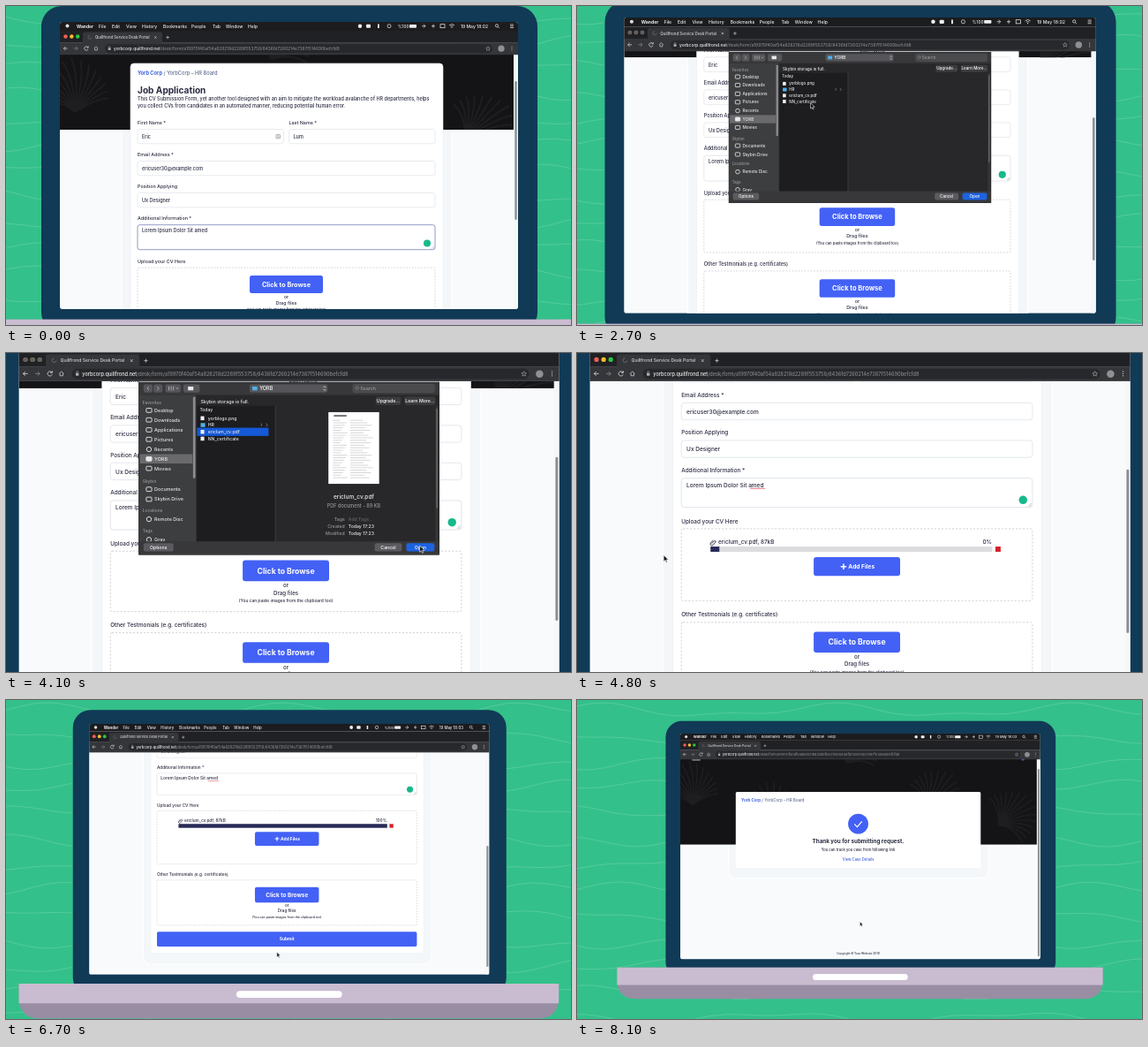
An HTML page for the animation above (8200 ms loop, 640 by 361 pixels).

```html
<!DOCTYPE html>
<html lang="en">
<head>
<meta charset="utf-8">
<title>Job application form</title>
<style>
  html, body { margin: 0; width: 100%; height: 100%; overflow: hidden; background: #34c08a; }
  svg { display: block; width: 100%; height: 100%; font-weight: 500; }
  text { font-family: Inter, "Open Sans", sans-serif; white-space: pre; }
</style>
</head>
<body>
<svg id="stage" viewBox="0 0 640 361"></svg>
<script>
const LOOP = 8200, STEP = 100;
const BLUE = '#4361f5', INK = '#2b2d42', LINE = '#dfe3ea';

// ---- markup helpers ----
const rect = (x, y, w, h, fill, more = '') =>
  `<rect x="${x}" y="${y}" width="${w}" height="${h}" fill="${fill}" ${more}/>`;
const text = (x, y, str, size = 5.5, fill = INK, more = '') =>
  `<text x="${x}" y="${y}" font-size="${size}" fill="${fill}" ${more}>${str}</text>`;
const dot = (x, y, r, fill, more = '') => `<circle cx="${x}" cy="${y}" r="${r}" fill="${fill}" ${more}/>`;
const path = (d, stroke, width = .7, more = '') =>
  `<path d="${d}" fill="none" stroke="${stroke}" stroke-width="${width}" ${more}/>`;
const group = (id, body, more = '') => `<g id="${id}" ${more}>${body}</g>`;
const MID = 'text-anchor="middle"', END = 'text-anchor="end"', BOLD = 'font-weight="700"';

// ---- laptop ----
function laptop() {
  return rect(40, 0, 562, 370, '#103a56', 'rx="23"') +
    '<path d="M-30 354.7H670V372Q670 400 642 400H-2Q-30 400 -30 372Z" fill="#998da4"/>' +
    '<path d="M-30 354.7H670V380H-30Z" fill="#c9bcd1"/>' +
    rect(252, 364, 137, 9, '#fff', 'rx="4.5"');
}

// ---- menu bar, tab strip and address bar ----
function browser() {
  const menu = [[105, 'File'], [120, 'Edit'], [136, 'View'], [154, 'History'], [178, 'Bookmarks'],
    [210, 'People'], [234, 'Tab'], [249, 'Window'], [274, 'Help']];
  const lights = colors => colors.map((c, i) => dot(67.5 + i * 6.85, 34.5, 2.2, c)).join('');
  const W = '#eee', G = '#b4b5b8';
  return rect(61, 18, 519, 10, '#1c1c1f') + dot(69.5, 22.6, 2, '#ddd') +
    text(80, 24.5, 'Wander', 5, W, BOLD) +
    menu.map(([x, s]) => text(x, 24.5, s, 5, W)).join('') +
    dot(401, 22.7, 2.2, W) + rect(408, 20.8, 5, 4, W, 'rx="1"') + rect(421, 20.5, 1.8, 4.5, W) +
    dot(434, 22.7, 2, 'none', `stroke="${W}" stroke-width=".7"`) +
    text(444, 24.5, '%100', 4.6, W) + rect(457, 20.9, 8, 3.8, W, 'rx=".8"') +
    path('M471 22.7H475M473 20.7L475 22.7 473 24.7M482 22.7H486M484 20.7V24.7', W) +
    rect(492, 20.7, 5, 4, 'none', `stroke="${W}" stroke-width=".7"`) +
    path('M502 21.8Q505 19.2 508 21.8M503.3 23.2Q505 21.7 506.7 23.2', W) + dot(505, 24.5, .6, W) +
    text(515, 24.5, '<tspan>19 May</tspan> <tspan id="clock">18:02</tspan>', 5, W) +
    dot(556, 22.3, 1.6, 'none', `stroke="${W}" stroke-width=".7"`) + path('M557.2 23.5L558.7 25', W) +
    path('M571 21H575M571 22.8H575M571 24.6H575', W) +
    rect(61, 28, 519, 13.5, '#202124') + rect(87, 29.5, 90, 13, '#35363a', 'rx="2.5"') +
    lights(['#f15f57', '#f5bd2e', '#2bc840']) + group('idle', lights(['#5f6064', '#5f6064', '#5f6064'])) +
    path('M95 33.2A2 2 0 1 0 97 35.3', '#777', .6) +
    text(101, 37, 'Quillfrond Service Desk Portal', 4.3, '#d5d6d9') +
    path('M168.2 34.3l2.4 2.4m0-2.4l-2.4 2.4M181.3 35.5h3.6M183.1 33.7v3.6', '#ddd', .6) +
    rect(61, 41.2, 519, 14, '#35363a') + rect(112, 43.2, 439, 10, '#27282b', 'rx="5"') +
    path('M69.7 48H65.3M67.3 46l-2 2 2 2', '#ddd') + path('M76.8 48h4.4M79.2 46l2 2-2 2', '#888') +
    path('M92.8 46.8A2.2 2.2 0 1 0 93 48.8M93.2 45.3v1.8h-1.9', '#ddd') +
    path('M99.8 48L102 45.8 104.2 48M100.6 47.6v2.4h2.8v-2.4', '#ddd', .6) +
    rect(115.8, 47.4, 2.8, 2.5, G) + path('M116.3 47.4v-.9a.9.9 0 0 1 1.8 0v.9', G, .5) +
    text(122, 49.8, '<tspan fill="#f1f1f1">yorbcorp.quillfrond.net</tspan>' +
      '/desk/form/a19970f40af54a828218d2289f553758/8436fd7260214e7387f514690befcfd8', 4.75, '#85868a') +
    path('M546 45.7l.7 1.6 1.7.2-1.3 1.1.4 1.7-1.5-.9-1.5.9.4-1.7-1.3-1.1 1.7-.2z', G, .5) +
    dot(561, 48.2, 3.6, '#8f9092') +
    [46, 48, 50].map(y => dot(573, y, .6, G)).join('');
}

// ---- page parts ----
function banner(bottom) {
  let leaves = '';
  [[78, 120], [185, 148], [300, 60], [415, 125], [520, 150], [590, 80]].forEach(([x, y], k) => {
    for (let i = 0; i < 15; i++) {
      const a = -2.9 + i * .18 + k * .25, r = 62 - Math.abs(i - 7) * 3;
      const px = x + r * Math.cos(a), py = y + r * Math.sin(a);
      leaves += `M${x} ${y}Q${(x + px) / 2 + 7} ${(y + py) / 2 - 9} ${px.toFixed(1)} ${py.toFixed(1)}`;
    }
  });
  return `<svg x="61" y="0" width="514" height="${bottom}" viewBox="61 0 514 ${bottom}">` +
    rect(61, 0, 514, bottom, '#141416') + path(leaves, '#1e1e20', 2) + '</svg>';
}

const crumbs = y => text(149, y, `<tspan fill="#3f62d8" font-weight="700">Yorb Corp</tspan>` +
  ' / YorbCorp – HR Board', 5.7, '#5d6b91');

// pale frame around the card, hidden where the banner lies over it
const halo = (y, h) => rect(131, y, 374, h, '#f4f7f9', 'rx="10" stroke="#fff" stroke-width="1.2"');

function field(x, y, w, label, value) {
  return text(x, y, label, 5.4) +
    rect(x, y + 5.5, w, 16.3, '#fff', `rx="2.5" stroke="${LINE}" stroke-width=".7"`) +
    text(x + 5, y + 16, value);
}

const dashed = (id, y, h) =>
  rect(149, y, 337, h, 'none', `id="${id}" rx="1.5" stroke="#c6c8d0" stroke-width=".7" stroke-dasharray="1.8 1.6"`);

const browse = y => rect(276, y, 83, 20, BLUE, 'rx="2.5"') +
  text(317.5, y + 12.7, 'Click to Browse', 7.3, '#fff', `${MID} ${BOLD}`) +
  text(317.5, y + 26, 'or', 5.2, INK, MID) + text(317.5, y + 33, 'Drag files', 5.2, INK, MID) +
  text(317.5, y + 40.4, '(You can paste images from the clipboard too)', 4.1, INK, MID);

function form() {
  const fileRow = path('M178.2 310.5l2.4-2.6a.9.9 0 0 1 1.3 1.2l-2.6 2.8a1.5 1.5 0 0 1-2.2-2l2.5-2.7', INK, .8) +
    text(184.5, 311, 'ericlum_cv.pdf, 87kB', 5.4) + text(447, 311, '0%', 5.4, INK, `id="percent" ${END}`) +
    rect(177, 313.3, 270.5, 5, '#dcdcde') + rect(177, 313.3, 8.5, 5, '#282a56', 'id="bar"') +
    rect(450.5, 313.3, 5, 5, '#d32228') +
    rect(276, 323.5, 83, 18, BLUE, 'rx="2.5"') + path('M302 332.5h5.4M304.7 329.8v5.4', '#fff', 1.3) +
    text(309.3, 334.5, 'Add Files', 5.6, '#fff', BOLD);
  const lower = text(149, 369, 'Other Testmonials (e.g. certificates)', 5.4) +
    dashed('box2', 374.5, 58.5) + browse(383.5) +
    rect(149, 441.5, 337, 19, BLUE, 'rx="2"') +
    text(317.5, 453, 'Submit', 5.6, '#fff', `id="submit" ${MID} ${BOLD}`) +
    path('M317.5 448.6A2.4 2.4 0 0 1 319.9 451', '#fff', .8, 'id="spinner"');
  return halo(52, 443) + banner(140) +
    rect(141, 65, 354, 415.5, '#fff', 'rx="4" stroke="#eceff4" stroke-width=".6"') + crumbs(78) +
    text(149, 98.5, 'Job Application', 10.1, INK, BOLD) +
    text(149, 107, 'This CV Submission Form, yet another tool designed with an aim to mitigate the workload avalanche of HR departments, helps') +
    text(149, 115, 'you collect CVs from candidates in an automated manner, reducing potential human error.') +
    field(149, 134, 165.5, 'First Name *', 'Eric') + field(320.5, 134, 165.5, 'Last Name *', 'Lum') +
    rect(306, 145.6, 4.5, 4.2, 'none', 'rx=".6" stroke="#777" stroke-width=".6"') + path('M307 147h2.5M307 148.4h2.5', '#777', .5) +
    field(149, 170, 337, 'Email Address *', 'ericuser30@example.com') +
    field(149, 206, 337, 'Position Applying', 'Ux Designer') +
    text(149, 242, 'Additional Information *', 5.4) +
    rect(149, 247.7, 337, 28, '#fff', 'id="area" rx="2.5" stroke-width=".8"') +
    text(154, 256.2, 'Lorem Ipsum Dolor Sit amed') + path('M215 257.6H229.5', '#d8434e', .6, 'id="typo"') +
    dot(477, 268.6, 4, '#16b98c') + path('M482 274.8l3-3M483.8 274.9l1.2-1.2', '#777', .4) +
    text(149, 291, 'Upload your CV Here', 5.4) + dashed('box1', 296.2, 58) +
    group('empty', browse(305)) +
    rect(153, 304.3, 329, 44, 'none', 'id="focus" stroke="#2f80dc" stroke-width="1.2"') +
    group('row', fileRow) + group('lower', lower);
}

function thanks() {
  return halo(90, 136) + banner(178) + rect(78, 54, 12, 3, '#8a8a8c') + dot(555, 54.5, 2.4, '#5167c9') +
    rect(141, 102, 353, 109.5, '#fff', 'rx="2"') + crumbs(115.8) +
    dot(317.5, 148, 14.5, BLUE) + path('M312 148.3l4 4 7-8', '#fff', 1.5) +
    text(317.5, 175.8, 'Thank you for submitting request.', 8, INK, `${MID} ${BOLD}`) +
    text(317.5, 187.8, 'You can track you case from following link', 5.3, INK, MID) +
    text(317.5, 200.7, 'View Case Details', 5.3, '#3f62d8', MID) +
    text(317.5, 336.5, 'Copyright © Your Website 2019', 4.1, INK, MID);
}

// ---- file picker ----
function picker() {
  const W = '#e8e8ea', G = '#98989c', SKY = '#4fb0ea';
  const button = (x, y, w, s, fill = '#5b5b5f') => rect(x, y, w, 9, fill, 'rx="2"') +
    text(x + w / 2, y + 6.4, s, 5.1, '#fff', MID);
  const heads = [[61, 'Favorites'], [148, 'Skybin'], [180, 'Locations'], [203, 'Tags']];
  const places = [[68, 'Desktop'], [78.5, 'Downloads'], [89.5, 'Applications'], [100, 'Pictures'], [111, 'Recents'],
    [121.5, 'YORB'], [132, 'Movies'], [155, 'Documents'], [166, 'Skybin Drive'], [188, 'Remote Disc'], [210.5, 'Gray']];
  const files = [[76.7, 'yorblogo.png'], [84.2, 'HR'], [91.7, 'ericlum_cv.pdf'], [99.2, 'NN_certificate']];
  const facts = [[188, 'Tags', 'Add Tags…'], [196, 'Created', 'Today 17:23'], [203.5, 'Modified', 'Today 17:23']];
  let lines = '';
  for (let i = 0; i < 24; i++) {
    const y = 79 + i * 2.75;
    lines += `M369 ${y}h${8 + i * 7 % 9}M388 ${y}h${14 + i * 5 % 12}`;
  }
  const preview = rect(364, 70, 56, 79, '#fff') + path(lines, '#bcbcc0', .6) + rect(370, 73, 14, 2, '#777') +
    text(392, 166, 'ericlum_cv.pdf', 6.4, W, MID) + text(392, 175, 'PDF document - 89 KB', 5.4, G, MID) +
    facts.map(([y, k, v], i) => text(382, y + 2, k, 5, G, END) + text(386, y + 2, v, 5, i ? W : '#626266')).join('');
  return rect(155, 37, 331, 190, '#28282a', 'stroke="#111" stroke-width=".8"') +
    rect(155, 37, 331, 14, '#38383b') + rect(155, 51, 63, 162, '#3d3e40') +
    rect(219, 63, 86, 150, '#1d1d1f') + rect(305, 63, 1, 150, '#3a3a3c') + rect(482, 63, 3, 150, '#353538') +
    rect(483, 66, 1.5, 110, '#69696c', 'rx=".7"') +
    [[160, 10], [171, 10], [184, 17], [204, 18]].map(([x, w]) => rect(x, 39.3, w, 9, '#56565a', 'rx="2"')).join('') +
    path('M166 41.8l-2 2 2 2M175 41.8l2 2-2 2M188 41.5v4.6M190.5 41.5v4.6M193 41.5v4.6M196 43l1.2 1.4 1.2-1.4', '#bbb', .8) +
    rect(209, 41.8, 6, 4.2, W, 'rx=".6"') +
    rect(277, 39.3, 86, 9, '#56565a', 'rx="2"') + rect(280, 41.7, 5.5, 4.3, SKY, 'rx=".6"') +
    text(288, 45.8, 'YORB', 5.4, '#fff') + path('M358.5 43l1.3-1.4 1.3 1.4M358.5 44.7l1.3 1.4 1.3-1.4', W, .7) +
    rect(391, 39.3, 90, 9, '#4a4a4d', 'rx="2" stroke="#5a5a5d" stroke-width=".5"') +
    dot(395.5, 43.4, 1.6, 'none', `stroke="${G}" stroke-width=".6"`) + text(399, 45.7, 'Search', 5.2, G) +
    text(223, 60, 'Skybin storage is full.', 5.2, W) +
    button(416, 53, 28, 'Upgrade…', '#3c3c3f') + button(448, 53, 34, 'Learn More…', '#3c3c3f') +
    rect(156, 116.3, 58, 10.3, '#6a6a6d') + rect(214.6, 53, 2.6, 90, '#8c8c8f', 'rx="1.3"') +
    heads.map(([y, s]) => text(159, y, s, 4.7, G)).join('') +
    places.map(([y, s], i) => (i === 4 || i > 8 ? dot(166, y, 2.6, 'none', `stroke="${W}" stroke-width=".9"`)
      : rect(163, y - 2.3, 6, 4.6, i === 5 ? W : 'none', `rx=".8" stroke="${W}" stroke-width=".9"`)) +
      text(172, y + 1.9, s, 5.3, W)).join('') +
    text(222, 69, 'Today', 4.9, W) + rect(219, 87.2, 79, 9, '#1559d6', 'id="pick"') +
    files.map(([y, s], i) => rect(223, y - 2.2, i === 1 ? 5 : 4, 4.4, i === 1 ? SKY : '#f0f0f0') +
      text(231, y + 1.8, s, 5, W)).join('') +
    path('M290 82.5v3M295.3 82.5l1.5 1.6-1.5 1.6', G, .7) + group('preview', preview) +
    rect(155, 212.5, 331, 14.5, '#38383b') + button(160, 214.5, 33, 'Options') +
    button(415, 214.5, 30, 'Cancel') + button(450, 214.5, 31, 'Open', '#1d63e0');
}

// ---- scene ----
const stage = document.getElementById('stage');
stage.innerHTML = `<defs>
  <clipPath id="screen">${rect(61, 18, 519, 325, '#000', 'rx="3"')}</clipPath>
  <clipPath id="view">${rect(61, 55, 519, 288, '#000')}</clipPath></defs>` +
  rect(0, 0, 640, 361, '#34c08a') + path('', '#74d5ae', 1, 'id="waves" opacity=".5"') +
  group('world', laptop() + group('shot',
    rect(61, 18, 519, 325, '#f8fafb') +
    group('page', group('form', form()) + group('thanks', thanks()) +
      rect(575, 55, 5, 288, '#f6f7f8') + rect(576.3, 85, 2.4, 157, '#8b8d90', 'id="thumb" rx="1.2"'), 'clip-path="url(#view)"') +
    browser() +
    group('picker', picker(), 'transform="translate(41.64 24) scale(.87)"') +
    group('cursor',
      '<path id="arrow" d="M0 0v6.2l1.5-1.4 1 2.3 1-.5-1-2.2h2.1z" fill="#111" stroke="#fff" stroke-width=".5"/>' +
      '<path id="hand" d="M-.7 0q.7-.9 1.4 0v2.4l2.6.6q.6.3.4 1.2l-.6 2.8h-3.6l-2.2-3q.4-.9 1.3 0l.7.5z" fill="#fff" stroke="#111" stroke-width=".5"/>'),
    'clip-path="url(#screen)"'));

const el = {};
stage.querySelectorAll('[id]').forEach(e => el[e.id] = e);
const show = (id, on) => el[id].setAttribute('display', on ? 'inline' : 'none');
const set = (id, name, value) => el[id].setAttribute(name, value);

// ---- motion ----
const span = (t, a, b) => Math.min(1, Math.max(0, (t - a) / (b - a)));
const cubic = u => u < .5 ? 4 * u ** 3 : 1 - 4 * (1 - u) ** 3;
const smooth = u => u * u * (3 - 2 * u);

// keys: [time, value...], eased between neighbours
function track(keys, t) {
  const i = keys.findIndex(k => k[0] > t);
  if (i === 0) return keys[0].slice(1);
  if (i < 0) return keys[keys.length - 1].slice(1);
  const a = keys[i - 1], b = keys[i], u = smooth(span(t, a[0], b[0]));
  return a.slice(1).map((v, k) => v + (b[k + 1] - v) * u);
}

const scrollKeys = [[600, 0], [1300, 78], [4400, 78], [4700, 99.5], [5000, 99.5], [5600, 165.5]];
const mouseKeys = [[800, 380, 285], [1500, 318, 236], [2200, 318, 236], [2800, 262, 102], [3000, 262, 102],
  [3400, 352, 169.6], [3900, 446, 213], [4150, 446, 213], [4700, 132, 222], [5100, 132, 222],
  [5750, 312, 297], [5950, 312, 297], [6200, 303, 316], [6700, 304.5, 314], [7100, 304.5, 314], [7700, 320, 289]];

function waves(t) {
  let d = '';
  for (let row = -1; row < 14; row++) {
    for (let x = -10; x <= 650; x += 10) {
      const y = row * 29 + 12 + 6 * Math.sin(x / 43 + row * 1.7 + t / 1900) + 3 * Math.sin(x / 21 - row + t / 2600);
      d += `${x < 0 ? 'M' : 'L'}${x} ${y.toFixed(1)}`;
    }
  }
  return d;
}

function draw(t) {
  const near = cubic(span(t, 1900, 4200)), far = cubic(span(t, 5550, 7410));
  const scale = 1 + .18 * near - .394 * far, top = 18 - 30 * near + 50 * far;
  set('world', 'transform', `translate(${320 + far * .5 - 320 * scale} ${top - 18 * scale}) scale(${scale})`);
  set('waves', 'd', waves(t));

  const done = t >= 7000, sent = t >= 4300, busy = t >= 5950 && t < 6500;
  const [scroll] = track(scrollKeys, t);
  show('form', !done);
  show('thanks', done);
  set('form', 'transform', `translate(0 ${-scroll})`);
  set('thumb', 'y', done ? 69 : 85 + scroll * .55);
  set('thumb', 'height', done ? 270 : 157);
  el.clock.textContent = t < 4000 ? '18:02' : '18:03';

  set('area', 'stroke', t < 900 ? '#7c7fb8' : LINE);
  show('typo', t >= 900);
  show('focus', t >= 1500 && t < 2200);
  show('empty', !sent);
  show('row', sent);
  set('box1', 'height', sent ? 69 : 58);
  set('lower', 'transform', `translate(0 ${sent ? 11.5 : 0})`);

  const loaded = span(t, 4900, 5500);
  set('bar', 'width', 8.5 + 262 * loaded);
  el.percent.textContent = Math.round(loaded * 100) + '%';
  show('submit', !busy);
  show('spinner', busy);
  set('spinner', 'transform', `rotate(${(t - 6200) * .6 - 60} 317.5 451)`);

  const open = t >= 2200 && !sent, picked = t >= 2900;
  show('picker', open);
  show('idle', open);
  show('pick', picked);
  show('preview', picked);

  const [x, y] = track(mouseKeys, t);
  const over = (t >= 1400 && t < 2200) || (t >= 5700 && t < 6050);
  show('cursor', t >= 800);
  set('cursor', 'transform', `translate(${x} ${y})`);
  show('hand', over);
  show('arrow', !over);
}

const start = performance.now();
function tick() {
  const t = (performance.now() - start) % LOOP;
  draw(Math.floor(t / STEP) * STEP);
  requestAnimationFrame(tick);
}
tick();
</script>
</body>
</html>
```
